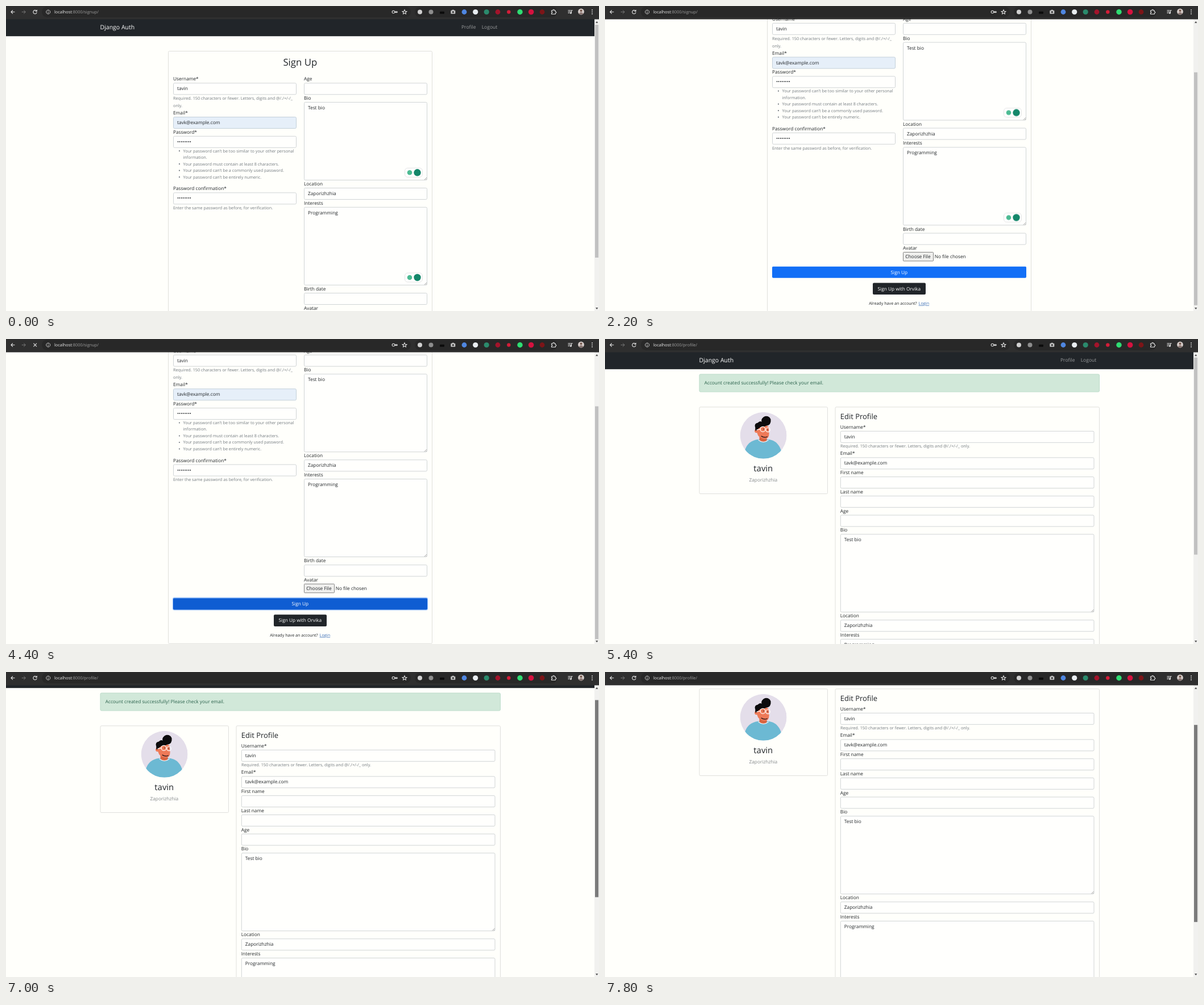
An HTML page that plays this animation: 1043 by 537 pixels, repeating every 8000 ms.

```html
<!DOCTYPE html>
<html lang="en">
<head>
<meta charset="utf-8">
<title>Sign up flow</title>
<style>
@property --s { syntax: "<number>"; inherits: true; initial-value: 0; }

html, body { margin: 0; width: 100%; height: 100%; overflow: hidden; background: #fffffb; }
svg {
  display: block; width: 1043px; height: 537px;
  font: 8.3px "Open Sans", "Noto Sans", sans-serif;
  text-rendering: geometricPrecision;
  animation: scroll 8s step-end infinite;
}
text { fill: #212529; white-space: pre; }
.small { font-size: 7.3px; }
.help { font-size: 7.3px; fill: #747b81; }
.muted { fill: #85898c; }
.mid { text-anchor: middle; }
.light { fill: #fff; }
.nav { font-size: 8.5px; fill: #9a9c9d; }
.url { font-size: 7.36px; fill: #9c9c9c; }
.url .host { fill: #ececec; }
.box { fill: #fffffd; stroke: #d0d4d6; }
.card { fill: none; stroke: #dfdfdc; }
.line { fill: none; stroke: #e3e3e3; stroke-width: 1.1; }

.page { transform: translateY(calc(var(--s) * -1px)); }
.thumb1 { transform: translateY(calc(var(--s) * .794px)); }
.thumb2 { transform: translateY(calc(var(--s) * .673px)); animation: grab 8s step-end infinite; }
.signup { animation: before 8s step-end infinite; }
.profile { animation: after 8s step-end infinite; }
.idle { animation: idle 8s step-end infinite; }
.busy { animation: busy 8s step-end infinite; }
.submit { animation: submit 8s step-end infinite; }

/* scroll offset: the sign up page first, the profile page from 60% */
@keyframes scroll {
  0% { --s: 0; }
  15% { --s: 45; }
  17.5% { --s: 94; }
  20% { --s: 98; }
  22.5% { --s: 101; }
  25% { --s: 103.5; }
  27.5% { --s: 105.5; }
  37.5% { --s: 106.5; }
  40% { --s: 107.7; }
  60% { --s: 0; }
  77.5% { --s: 3; }
  80% { --s: 5.3; }
  82.5% { --s: 9.5; }
  85% { --s: 16.5; }
  87.5% { --s: 25; }
  90% { --s: 40; }
  92.5% { --s: 57; }
  95% { --s: 75; }
  97.5%, 100% { --s: 90; }
}
@keyframes before { 0% { visibility: visible; } 60%, 100% { visibility: hidden; } }
@keyframes after { 0% { visibility: hidden; } 60%, 100% { visibility: visible; } }
@keyframes idle { 0% { opacity: 1; } 47.5% { opacity: 0; } 60%, 100% { opacity: 1; } }
@keyframes busy { 0% { opacity: 0; } 47.5% { opacity: 1; } 60%, 100% { opacity: 0; } }
@keyframes submit { 0% { fill: #126ff6; } 42.5%, 100% { fill: #0f5dd2; } }
@keyframes grab { 0% { fill: #c1c1c1; } 72.5%, 100% { fill: #7b7b7b; } }
</style>
</head>
<body>
<svg id="stage" viewBox="0 0 1043 537"></svg>
<script>
const USER = "tavin", EMAIL = "tavk@example.com";
const CITY = "Zaporizhzhia", HOBBY = "Programming", DOTS = "•".repeat(8);
const RULE = "Required. 150 characters or fewer. Letters, digits and @/./+/-/_";

const text = (x, y, s, cls = "", size) =>
  `<text x="${x}" y="${y}" class="${cls}"${size ? ` style="font-size:${size}px"` : ""}>${s}</text>`;
const rect = (x, y, w, h, attrs = "") =>
  `<rect x="${x}" y="${y}" width="${w}" height="${h}" ${attrs}/>`;
const dot = (x, y, r, fill) => `<circle cx="${x}" cy="${y}" r="${r}" fill="${fill}"/>`;
const path = (d, attrs = 'class="line"') => `<path d="${d}" ${attrs}/>`;

const field = (x, y, w, label, value = "", style = "") =>
  text(x, y - 4, label) +
  rect(x + .5, y + .5, w - 1, 20, `class="box" rx="2" style="${style}"`) +
  text(x + 7, y + 13, value);

const area = (x, y, w, label, value) =>
  text(x, y - 4, label) +
  rect(x + .5, y + .5, w - 1, 137, 'class="box" rx="2"') +
  text(x + 7, y + 13, value) +
  path(`M${x + w - 5} ${y + 137}l4-4m-1.5 4l1.5-1.5`, 'stroke="#777" stroke-width=".7"');

const helper = y => `<g class="idle">
  ${rect(701.5, y - 8, 31, 16, 'rx="5" fill="#fff" stroke="#dedede" stroke-width=".8"')}
  ${dot(710, y, 4.3, "#4dbb93")}${dot(723.5, y, 6.2, "#14876a")}</g>`;

const navbar = rect(0, 23, 1035, 30.2, 'fill="#212529"') +
  text(165.5, 41, "Django Auth", "light", 10.5) +
  text(801, 39.5, "Profile", "nav") + text(836.7, 40.2, "Logout", "nav");

const tips = [
  "Your password can’t be too similar to your other personal",
  "information.",
  "Your password must contain at least 8 characters.",
  "Your password can’t be a commonly used password.",
  "Your password can’t be entirely numeric."
].map((s, i) => text(311.5, 257.5 + i * 11.5, s, "help") +
  (i === 1 ? "" : dot(305, 255.2 + i * 11.5, 1.1, "#747b81"))).join("");

const signup = `<g class="signup"><g class="page">
  ${navbar}
  ${rect(285.5, 79.5, 464, 564.5, 'class="card" rx="2"')}
  ${text(517.3, 104.5, "Sign Up", "mid", 16.8)}
  ${field(294, 135.3, 217, "Username*", USER)}
  ${text(294, 165, RULE, "help")}${text(294, 178, "only.", "help")}
  ${field(294, 195, 217, "Email*", EMAIL, "fill:#e6eff9;stroke:#c3d0da")}
  ${field(294, 228.8, 217, "Password*", DOTS)}
  ${tips}
  ${field(294, 328.3, 217, "Password confirmation*", DOTS)}
  ${text(294, 358, "Enter the same password as before, for verification.", "help")}
  ${field(524, 135.3, 217, "Age")}
  ${area(524, 169, 217, "Bio", "Test bio")}${helper(293.3)}
  ${field(524, 320, 217, "Location", CITY)}
  ${area(524, 353.8, 217, "Interests", HOBBY)}${helper(478)}
  ${field(524, 505, 217, "Birth date")}
  ${text(524, 534.8, "Avatar")}
  ${rect(524.5, 539, 53, 15.5, 'rx="1" fill="#efefed" stroke="#767676" stroke-width=".9"')}
  ${text(528.3, 549.6, "Choose File")}${text(579.7, 549.6, "No file chosen")}
  ${rect(293, 562.8, 449, 22.4, 'class="busy" rx="3" fill="#8ebafa"')}
  ${rect(294, 564, 447, 20.3, 'class="submit" rx="2"')}
  ${text(517.3, 577, "Sign Up", "mid light")}
  ${rect(471, 593, 93, 20.6, 'rx="2" fill="#212529"')}
  ${text(517.3, 606, "Sign Up with Orvika", "mid light")}
  ${text(464.3, 631.6, "Already have an account?", "", 7.15)}
  <text x="551.6" y="631.6" class="small" style="fill:#3d70b8;text-decoration:underline">Login</text>
</g></g>`;

const avatar = `<clipPath id="round"><circle r="41"/></clipPath>
<g transform="translate(278.6 169.8)" clip-path="url(#round)">
  ${dot(0, 0, 41, "#e4deea")}
  ${path("M-35 41C-34 20-26 9-9 7L9 7C24 9 32 20 34 41Z", 'fill="#6cb9d3"')}
  ${path("M-7-2H6V9Q0 14-7 9Z", 'fill="#d9633f"')}
  ${path("M-9 8Q0 15 9 8", 'fill="none" stroke="#f4f1f4" stroke-width="1.3"')}
  ${path("M-11-16Q0-22 9-15L10-3Q10 6 2 6Q-9 5-11-4Z", 'fill="#ee7a58"')}
  ${dot(-12, -8, 3.5, "#ee7a58")}
  ${path("M-14-8Q-16-18-9-23Q-6-26-3-24C-6-33 10-38 13-28Q14-18 5-17Q0-14-7-15L-10-10Z", 'fill="#0c0b0d"')}
  ${dot(-10, -17, 5, "#0c0b0d")}${dot(5, -27, 7, "#0c0b0d")}
  <g fill="none" stroke="#fff" stroke-width="1.2"><circle cx="-1" cy="-11" r="4.5"/><circle cx="8" cy="-10" r="3.8"/><path d="M-5-11L-12-10"/></g>
  ${dot(0, -11, .8, "#2b1a18")}${dot(7.5, -10, .8, "#2b1a18")}
  ${path("M-4 1Q2 5 7 2", 'fill="none" stroke="#351d1c" stroke-width="1.5"')}
</g>`;

const profile = `<g class="profile"><g class="page">
  ${navbar}
  ${rect(166, 62, 703.5, 31, 'rx="2" fill="#d1e8d9" stroke="#bcdcca"')}
  ${text(174.7, 80.2, "Account created successfully! Please check your email.").replace("<text", '<text fill="#0f5132" style="fill:#28604a"')}
  ${rect(166, 119.8, 225.5, 152.7, 'class="card" rx="2"')}
  ${avatar}
  ${text(278.3, 233, USER, "mid", 14.9)}${text(278.3, 250.8, CITY, "mid muted")}
  ${rect(405, 119.8, 464.5, 700, 'class="card" rx="2"')}
  ${text(413.7, 140.6, "Edit Profile", "", 13)}
  ${field(413.8, 161.8, 446.7, "Username*", USER)}
  ${text(414, 191.4, RULE + " only.", "help")}
  ${field(413.8, 208.4, 446.7, "Email*", EMAIL)}
  ${field(413.8, 242.2, 446.7, "First name")}
  ${field(413.8, 275.9, 446.7, "Last name")}
  ${field(413.8, 309.6, 446.7, "Age")}
  ${area(413.8, 343.3, 446.7, "Bio", "Test bio")}
  ${field(413.8, 494.3, 446.7, "Location", CITY)}
  ${area(413.8, 528.1, 446.7, "Interests", HOBBY)}
</g></g>`;

const scrollbar = rect(1035, 23, 8, 514, 'fill="#f1f1ef"') +
  path("M1037 30h4.4l-2.2-3.2zM1037 531h4.4l-2.2 3.2z", 'fill="#555"') +
  `<g class="signup">${rect(1036, 33, 6, 410, 'class="thumb1" fill="#c1c1c1"')}</g>` +
  `<g class="profile">${rect(1036, 32.6, 6, 347, 'class="thumb2"')}</g>`;

const address = (page, cls) => `<g class="${cls}"><text x="85" y="13.3" class="url"><tspan class="host">localhost</tspan>:8000/${page}/</text></g>`;

// extension badges: x, radius, colour
const badges = [
  [728, 4, "#d0d0d0"], [747.5, 4, "#8d8d8d"], [806, 4.4, "#4f86e0"],
  [825.7, 4.6, "#e9edf0"], [845.2, 4.6, "#2b8a6c"], [865, 4.4, "#a3142b"], [884.3, 3.2, "#d51d38"],
  [904, 4.7, "#2fdc72"], [923.6, 4.8, "#d5123f"], [943, 4.4, "#7c1518"]
].map(([x, r, c]) => dot(x, 10.5, r, c)).join("");

const toolbar = rect(0, 0, 1043, 23.4, 'fill="#2f2f2f"') +
  rect(63, 1, 649, 19, 'rx="9.5" fill="#282828"') +
  rect(719, 1, 251, 19, 'rx="9.5" fill="#282828"') +
  path("M15.4 10.5H9M12 7.4L8.9 10.5L12 13.6") +
  path("M27.8 10.5H34M31.2 7.4L34.3 10.5L31.2 13.6", 'fill="none" stroke="#777"') +
  `<g class="idle">${path("M53.6 8.6A3.2 3.2 0 1 0 54.2 11.2M54.3 6.8V9.3H51.6")}</g>` +
  `<g class="busy">${path("M48.4 7.7L54 13.3M54 7.7L48.4 13.3")}</g>` +
  path("M74.2 7a3.5 3.5 0 1 0 .01 0M74.2 10v2.5M74.2 8.3v.9", 'fill="none" stroke="#ddd" stroke-width=".9"') +
  address("signup", "signup") + address("profile", "profile") +
  path("M681.4 8.2a2.3 2.3 0 1 0 .01 0M683.5 9.7H688V12M685.8 10V12M683.5 11.5H688") +
  path("M701 6.6l1.1 2.6 2.8.2-2.1 1.9.6 2.7-2.4-1.4-2.4 1.4.6-2.7-2.1-1.9 2.8-.2z") +
  badges + rect(763, 9.8, 8, 4, 'rx="1" fill="#0b0b0b"') +
  rect(782.3, 7.8, 8, 6, 'rx="1" fill="#c4c4c4"') + rect(784.5, 6.7, 3.5, 2, 'fill="#c4c4c4"') +
  dot(786.3, 10.8, 1.7, "#3a3a3a") +
  path("M959.5 8H962Q961.8 6.2 963.2 6.2T964.4 8H966.3V10Q968 10 968 11.2T966.3 12.5V14.3H959.5V12.3Q961 12.2 961 11.2T959.5 10Z") +
  path("M988.5 7.8h5M988.5 10h5M988.5 12.2h3M994.5 12.5V7.7h2.2") + dot(993.4, 12.5, 1.4, "#e3e3e3") +
  dot(1011.5, 10, 5.4, "#d8cfcc") + dot(1011.5, 8.2, 2, "#76594e") +
  path("M1007.5 13.5Q1011.5 8.6 1015.5 13.5Q1011.5 17 1007.5 13.5Z", 'fill="#8b7773"') +
  [7, 10.4, 13.8].map(y => dot(1031, y, .95, "#e3e3e3")).join("");

document.getElementById("stage").innerHTML =
  rect(0, 0, 1043, 537, 'fill="#fffffb"') + signup + profile + scrollbar + toolbar;
</script>
</body>
</html>
```
